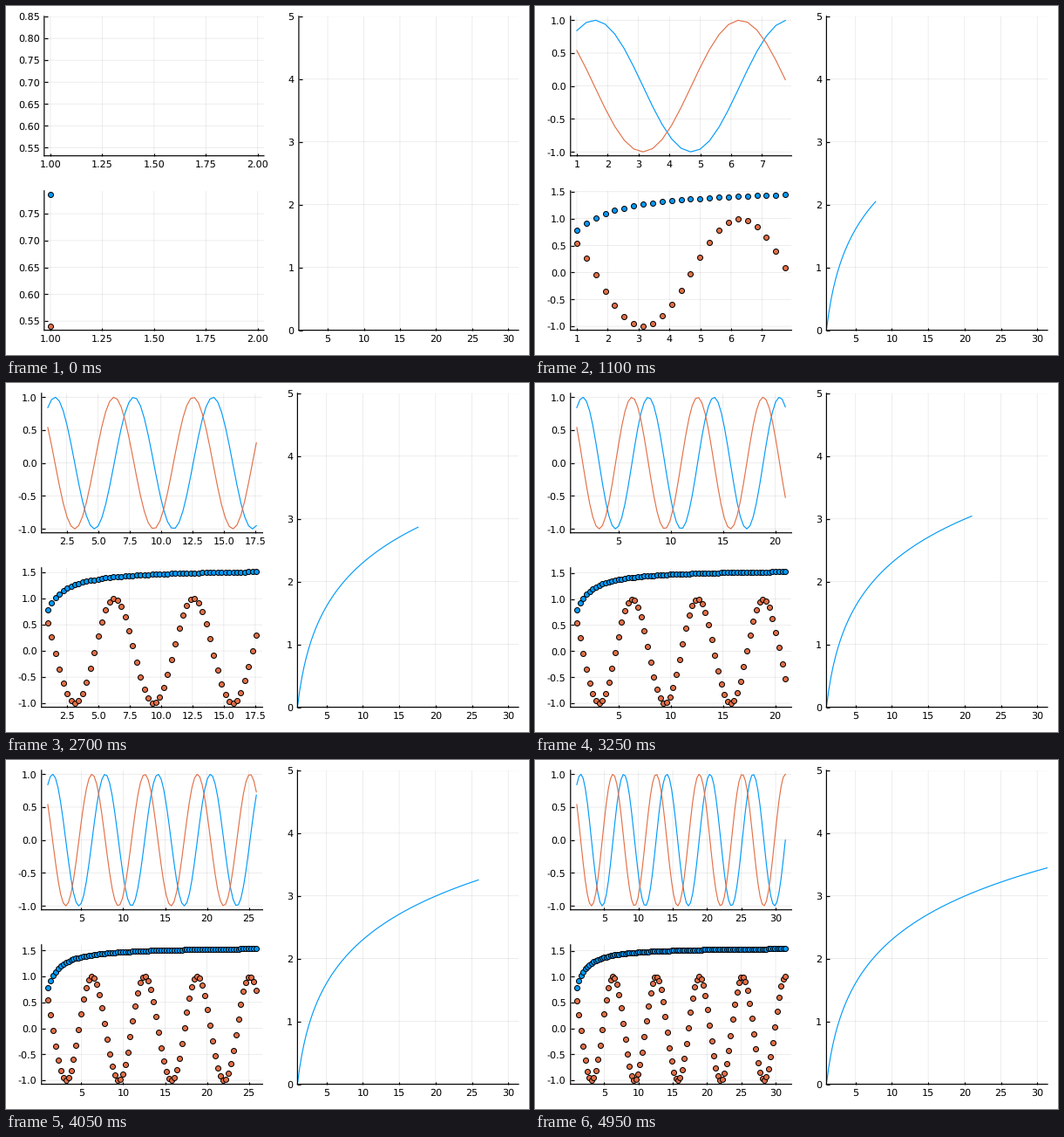
Recreate the animation shown at these times as a matplotlib script. Size 600 px wide and 400 px high, loop 5000 ms.

```python
import math

import matplotlib.pyplot as plt
import numpy as np
from matplotlib.animation import FuncAnimation

WIDTH, HEIGHT, DPI = 600, 400, 100
PX = 72 / DPI  # points per pixel
BLUE, ORANGE = "#009afa", "#e36f47"
X = np.linspace(1, 10 * math.pi, 100)

RIGHT, GAP = 588, 40
TOP, BOTTOM = 11.8, 371.6
MID_BOTTOM, MID_TOP = 171.7, 211.8
FONT_SIZE = 8
EM = FONT_SIZE / PX

# (step, niceness) pairs tried when choosing ticks
STEPS = [(1.0, 1.0), (5.0, 0.9), (2.0, 0.7), (2.5, 0.5), (3.0, 0.2)]
MIN_TICKS, MAX_TICKS, IDEAL_TICKS = 4, 8, 5

plt.rcParams.update({
    "path.snap": False,
    "font.family": "DejaVu Sans",
    "text.hinting": "none",
})


def widen(values):
    """Data limits with a 3 % margin on both sides."""
    lo, hi = float(np.min(values)), float(np.max(values))
    if lo == hi:
        hi = lo + 1
    margin = 0.03 * (hi - lo)
    return lo - margin, hi + margin


def choose_ticks(lo, hi):
    """Search for the ticks with the best granularity, coverage and niceness."""
    span = hi - lo
    power = math.floor(math.log10(span)) + 1
    best, best_score = [], -math.inf
    while 2 * MAX_TICKS * 10.0 ** (power + 1) > span:
        for count in range(MIN_TICKS, 2 * MAX_TICKS + 1):
            for q, niceness in STEPS:
                step = q * 10.0 ** power
                reach = (count - 1) * step
                if reach < span:
                    continue
                first = math.ceil((hi - reach) / step)
                while first * step <= lo:
                    ticks = [(first + i) * step for i in range(count)]
                    ticks = [t for t in ticks if lo <= t <= hi]
                    n = len(ticks)
                    if MIN_TICKS <= n <= MAX_TICKS:
                        simple = 1.0 if first <= 0 and -first < count else 0.0
                        grain = 1 - abs(n - IDEAL_TICKS) / IDEAL_TICKS
                        cover = 1.5 * span / ((n - 1) * step)
                        score = grain / 4 + simple / 6 + cover / 3 + niceness / 4
                        if reach > span:
                            score -= 10000
                        if score > best_score:
                            best, best_score = ticks, score
                    first += 1
        power -= 1
    return best


def format_ticks(ticks):
    """Labels sharing the fewest decimals that show every tick exactly."""
    digits = 0
    while any(abs(round(t, digits) - t) > 1e-9 for t in ticks):
        digits += 1
    return [f"{round(t, digits) + 0.0:.{digits}f}" for t in ticks]


def text_width(label):
    advance = {".": 0.318, "-": 0.361}
    return EM * sum(advance.get(c, 0.636) for c in label)


def set_scale(ax, xlim, ylim):
    """Apply limits and ticks; return the width of the widest y label."""
    xticks, yticks = choose_ticks(*xlim), choose_ticks(*ylim)
    ylabels = format_ticks(yticks)
    ax.set_xticks(xticks, format_ticks(xticks))
    ax.set_yticks(yticks, ylabels)
    ax.set(xlim=xlim, ylim=ylim)
    for label in ax.get_xticklabels():
        label.set_va("baseline")
    return max(map(text_width, ylabels))


def place(ax, left, top, width, bottom):
    ax.set_position([left / WIDTH, 1 - bottom / HEIGHT,
                     width / WIDTH, (bottom - top) / HEIGHT])


def make_axes():
    ax = fig.add_axes([0, 0, 1, 1], label=str(len(fig.axes)))
    ax.patch.set_visible(False)
    ax.set_axisbelow(True)
    ax.spines[["top", "right"]].set_visible(False)
    ax.spines[["left", "bottom"]].set_linewidth(1.2 * PX)
    ax.tick_params(direction="in", length=3.5 * PX, width=1.2 * PX,
                   labelsize=FONT_SIZE)
    ax.tick_params(axis="x", pad=13.6 * PX)
    ax.tick_params(axis="y", pad=5.3 * PX)
    ax.grid(color="black", alpha=0.1, linewidth=0.7 * PX)
    return ax


def add_line(ax, color):
    return ax.plot([], [], color=color, lw=1.15 * PX)[0]


def add_dots(ax, color):
    return ax.plot([], [], "o", mfc=color, mec="black",
                   ms=6 * PX, mew=1 * PX)[0]


fig = plt.figure(figsize=(WIDTH / DPI, HEIGHT / DPI), dpi=DPI, facecolor="white")
waves, dots, growth = make_axes(), make_axes(), make_axes()
curves = [
    (add_line(waves, BLUE), np.sin),
    (add_line(waves, ORANGE), np.cos),
    (add_dots(dots, BLUE), np.arctan),
    (add_dots(dots, ORANGE), np.cos),
    (add_line(growth, BLUE), np.log),
]
set_scale(growth, (1, 10 * math.pi), (0, 5))


def draw(frame):
    x = X[:frame + 1]
    for curve, func in curves:
        curve.set_data(x, func(x))

    xlim = widen(x)
    label_width = max(
        set_scale(waves, xlim, widen([np.sin(x), np.cos(x)])),
        set_scale(dots, xlim, widen([np.arctan(x), np.cos(x)])),
    )
    # Wider labels push the left column in; both columns stay equally wide.
    left = 19.1 + label_width
    width = (RIGHT - GAP - left) / 2
    place(waves, left, TOP, width, MID_BOTTOM)
    place(dots, left, MID_TOP, width, BOTTOM)
    place(growth, RIGHT - width, TOP, width, BOTTOM)
    return [curve for curve, _ in curves]


anim = FuncAnimation(fig, draw, frames=len(X), interval=50,
                     repeat=True, repeat_delay=0)
plt.show()
```
